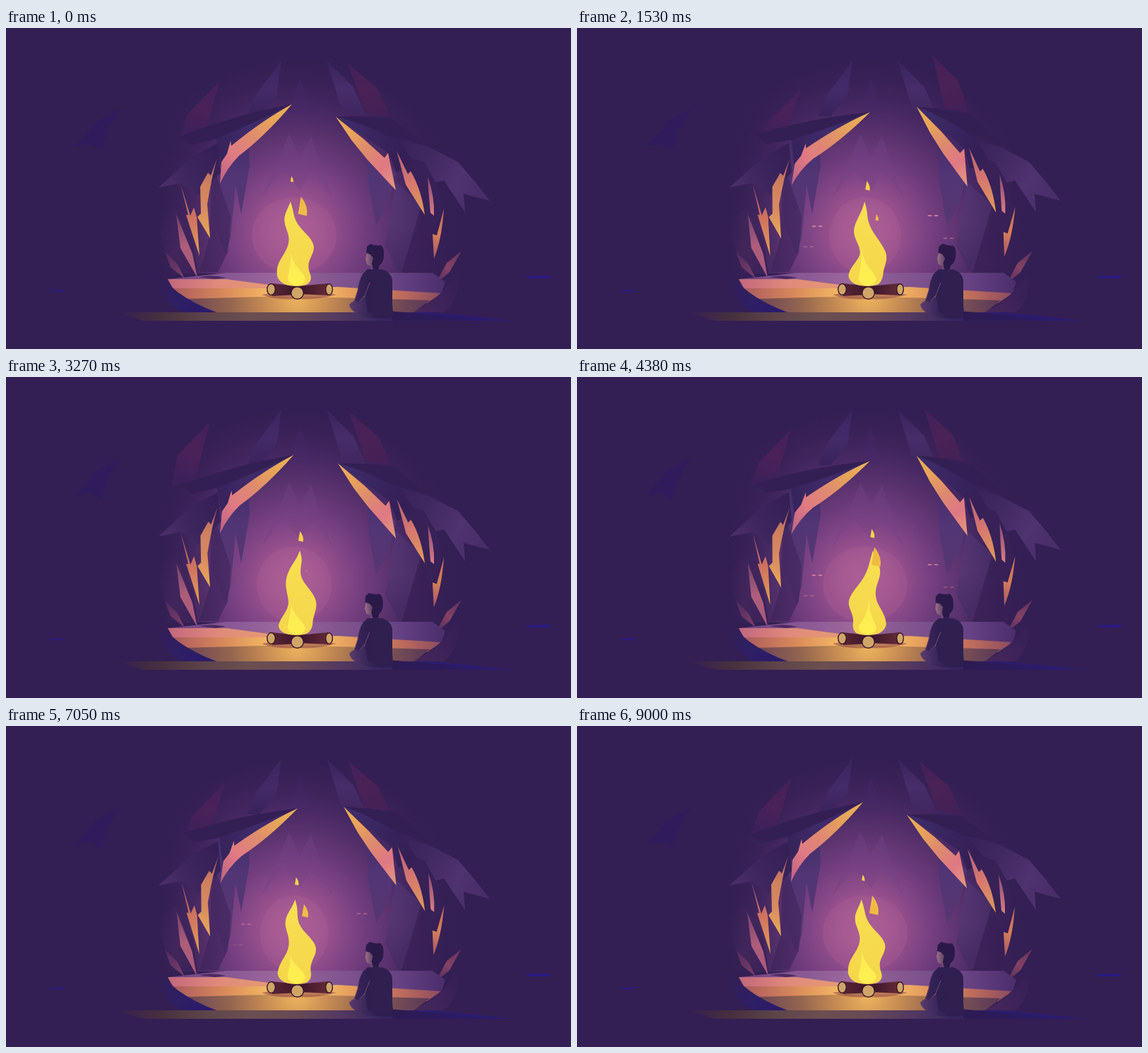
An HTML page with a canvas for the animation above (9.03 s loop, 800 by 455 pixels).

```html
<!DOCTYPE html>
<html>
<head>
<meta charset="utf-8">
<style>
html, body { margin: 0; width: 100%; height: 100%; overflow: hidden; background: #331f53 }
canvas { display: block }
</style>
</head>
<body>
<canvas id="stage" width="800" height="455"></canvas>
<script>
const c = document.getElementById('stage').getContext('2d');
const LOOP = 9030, BG = '#331f53', CLEAR = 'rgba(51,31,83,0)';
const { sin, cos, PI, sqrt, min, max, exp } = Math;

function stops(g, list) {
  list.forEach((col, i) => g.addColorStop(i / (list.length - 1), col));
  return g;
}
const lin = (x0, y0, x1, y1, ...cols) => stops(c.createLinearGradient(x0, y0, x1, y1), cols);
const rad = (x, y, r, ...cols) => stops(c.createRadialGradient(x, y, 0, x, y, r), cols);

function fill(d, style) {
  c.fillStyle = style;
  c.fill(new Path2D(d));
}

function oval(x, y, rx, ry, style) {
  c.beginPath();
  c.ellipse(x, y, rx, ry, 0, 0, 2 * PI);
  c.fillStyle = style;
  c.fill();
}

function turned(x, y, deg, dx, dy, draw) {
  c.save();
  c.translate(x + dx, y + dy);
  c.rotate(deg * PI / 180);
  c.translate(-x, -y);
  draw();
  c.restore();
}

// All motion is a function of p, the share of the loop that has passed
const turn = (p, n) => 2 * PI * n * p;
const swell = p => (1 - cos(turn(p, 3))) / 2;
function sway(p) {
  const s = swell(p);
  return s + (1 - s) * .2 * sin(PI * p) ** 2;
}

function cave(p) {
  fill('M0 0H800V455H0Z', BG);
  fill('M170 40H660V348H170Z', rad(408, 288, 245, '#a65c93', '#a15891', '#934e8b', '#7e4484', '#6b3a7a',
    '#5b336e', '#4c2b66', '#40255d', '#382156', BG));
  oval(408, 294, 54 + 6 * cos(turn(p, 2)), 54, 'rgba(190,105,150,.2)');
  fill('M362 240L384 190L401 150L416 182L432 153L446 195L462 240L432 200L417 230L392 200Z', 'rgba(116,66,132,.4)');
  fill('M416 70L433 122H400Z', 'rgba(70,42,106,.35)');

  const column = lin(0, 140, 0, 345, '#402a66', '#513575', '#573671', '#462b65');
  fill('M297 152L342 146L345 195L333 264L325 222L318 296L311 322L293 275Z', column);
  fill('M292 190L318 268L314 318L300 346H274L288 298Z', 'rgba(69,39,96,.75)');
  fill('M510 165L552 205L541 250L524 280L514 225Z', column);
  fill('M552 218L592 255L578 300L556 346L537 308Z', column);
  fill('M590 245L622 262L610 347H560Z', 'rgba(62,34,88,.85)');
  fill('M160 40H310V348H160Z', lin(215, 0, 310, 0, BG, CLEAR));
  fill('M540 40H670V348H540Z', lin(545, 0, 645, 0, CLEAR, BG));

  fill('M390 46L383 96L359 125H341L354 95Z', lin(0, 46, 0, 128, '#3a2560', '#432b69', '#38225a'));
  fill('M454 46L492 84L509 123L477 121Z', lin(0, 46, 0, 125, '#38235d', '#472d69', '#402760'));
}

function eyes(p) {
  const pair = (x, y, late, strength) => {
    c.globalAlpha = strength * max(0, swell(p - late) * 1.6 - .6);
    for (const d of [-4.5, 4.5]) oval(x + d, y, 3.2, 1, '#df86a7');
    c.globalAlpha = 1;
  };
  pair(340, 281, .01, .9);
  pair(504, 266, .01, .9);
  pair(526, 298, .05, .7);
  pair(328, 310, .01, .4);
}

function leftWall(p) {
  const s = sway(p), top = .65 * (cos(turn(p, 1)) - cos(turn(p, 3)));
  const x = 15 * top, y = 11 * top;

  fill(`M${303 + x} ${75 + y}L${257 + x} ${122 + y}L${247 + 12 * top} 154L${283 + x} 143Z`,
    lin(300, 75, 260, 153, '#452058', '#4a2258', '#3c205a'));
  fill('M216 226L262 184L300 163L304 205L272 238L248 220Z', lin(216, 225, 300, 180, '#4d306b', '#3d255d', '#352056'));
  fill('M212 273L240 256L264 300L272 352L230 333Z', lin(212, 300, 270, 310, BG, '#42265b', '#3c2259'));
  turned(304, 217, 5 * s, s, 2 * s, () => {
    fill('M297 156L405 108Q358 150 327 181L305 197Z', lin(300, 150, 390, 120, '#38245c', '#402b6b', '#3a2764'));
    fill('M246 154Q320 124 405 108Q350 135 297 157L262 166Z', BG);
    fill('M405 108Q364 130 319 167L318 160L313 178L305 190L303 221Q313 198 330 181Q366 154 405 108Z',
      lin(405, 108, 304, 215, '#edb255', '#e6a45a', '#df8a70', '#e07a84', '#c06582'));
  });
  turned(270, 300, 1.2 * s, 0, 0, () => {
    fill('M299 184L290 209L286 205L275 225L276 263L271 268L289 298L285 250Q291 212 299 184Z',
      lin(299, 184, 286, 296, '#a95b70', '#cf805f', '#d88c60', '#e8aa59'));
    fill('M247 221L258 265L255 265L274 323L270 268L266 254L261 266Z',
      lin(247, 221, 274, 322, '#a8587b', '#cf745f', '#e49f59'));
    fill('M241 264L247 312L271 354L264 320Z', lin(241, 264, 270, 352, '#6f416f', '#ae5e7a', '#a95a7d'));
  });
  fill('M225 317L233 339L253 355L243 335Z', lin(225, 317, 253, 355, '#4f2a5d', '#7c4069'));
}

function rightWall(p) {
  const s = sway(p), top = 1.2 * sin(2.5 * PI * p) ** 2 * (1 - p ** 12);
  const x = 17 * top, y = -10 * top;

  fill(`M${484 + x} ${50 + y}L${526 + x * .7} ${86 + y}L${546 + 8 * top} ${127 - 6 * top}L${509 + x * .6} ${119 + y * .5}Z`,
    lin(490, 45, 540, 125, '#442059', '#4a2256', '#412056'));
  fill('M540 154L598 168L640 190L664 218L685 245L648 235L650 261L620 216L598 222L570 190Z',
    lin(545, 160, 685, 245, '#352057', '#3f285f', '#4f3270', '#462c67'));
  fill('M551 178L592 190L612 225L617 262L600 300L588 255Z', '#372157');
  turned(553, 228, 6.9 * s, s, -5 * s, () => {
    fill('M467 126L546 146L578 190L553 205L541 177Z', lin(480, 130, 560, 180, '#3d2d6b', '#39255f', '#352056'));
    fill('M467 126Q510 124 546 128L592 164L548 156Q500 133 467 126Z', BG);
    fill('M467 126L506 157L536 184L541 177L552 230L512 187L490 160Z',
      lin(467, 126, 552, 225, '#edb154', '#e7a35a', '#dd8a6e', '#df7884', '#e3987c'));
  });
  turned(600, 280, 1.2 * s, 0, -3 * s, () => {
    fill('M553 174L569 207L573 203Q588 228 593 265L566 222Z', lin(553, 174, 593, 264, '#b3607a', '#d7786f', '#de9b5a'));
    fill('M597 211Q607 237 606 266L601 262L599 240Z', lin(597, 211, 606, 266, '#8d4a75', '#d97f83'));
    fill('M620 256Q617 300 606 327L604 292L610 294Z', lin(620, 256, 606, 326, '#bc6560', '#d58059', '#a95669'));
  });
  fill('M645 316L624 333L608 363L628 346Z', lin(645, 316, 608, 363, '#5f3060', '#844264', '#4f2a5c'));
}

function ground() {
  fill('M229 356L312 347H604L622 360L616 378H240Z',
    lin(229, 0, 622, 0, '#6c4180', '#855693', '#9d679c', '#84568f', '#6b4687', '#4b2d6c'));
  fill('M229 356H312L372 364L366 371H238Z', lin(229, 0, 372, 0, '#c3677c', '#df8a7c', '#e59a72'));
  fill('M234 369H390L470 367L617 376L596 390H262Z', rad(412, 374, 205, '#fbcf6b', '#efb062', '#d98a5a', '#b9685d', '#8a4b60'));
  fill('M250 384L400 380L600 386L577 404H298Z', rad(412, 382, 190, '#eeb45e', '#c48a53', '#94654f', '#754c55', '#573657'));
  fill('M273 353Q292 349 312 354L296 356Z', '#4c2a61');

  // Banks curving up on both sides
  fill('M213 340Q232 378 298 403H250Q214 385 213 340Z', lin(213, 345, 290, 403, BG, '#2f1f63', '#2a1a6c'));
  fill('M640 335Q630 375 577 403H620Q645 385 640 335Z', lin(590, 400, 645, 350, '#452659', '#3b2259', BG));

  fill('M155 403H600L722 415H195Z',
    lin(155, 0, 722, 0, BG, '#46303f', '#5d4449', '#6b4f50', '#684a55', '#553a61', '#36265f', '#2b1d72', '#2b1c79', BG));
  fill('M540 401L590 405L720 415H548Z', lin(540, 0, 720, 0, '#2d1b50', '#2b1b60', '#281b80'));
  fill('M735 352L772 351L768 355H740Z M60 371H82V373H64Z', '#291a84');
  fill('M98 168L130 132L162 114L143 146L135 174L120 164Z', 'rgba(43,23,112,.35)');
}

function cut(x, y, rx, ry) {
  oval(x, y, rx, ry, '#d0a568');
  c.lineWidth = 1.4;
  c.strokeStyle = '#35152c';
  c.stroke();
}

function logs() {
  fill('M362 378Q412 368 468 378Q440 386 412 384Q380 386 362 378Z', 'rgba(139,64,72,.55)');
  fill('M376 362L414 366V378L377 380Z', lin(376, 0, 414, 0, '#5a2633', '#3d152b'));
  fill('M456 362L414 366V377L457 379Z', lin(418, 0, 456, 0, '#3d152b', '#642c37'));
  cut(375.5, 370.5, 5.8, 8);
  cut(457.5, 370.5, 4.8, 7.8);
}

function fire(p) {
  const lean = -8 * cos(turn(p, 1)), N = 11;
  const side = (u, dir) => {
    const wave = sin(2 * PI * (1.4 * u - 5 * p - .45));
    const ripple = 3 * sin(2 * PI * (2.2 * u - 14 * p) + dir);
    const half = 25 * (1 - u ** 1.6) * sqrt(min(1, u * 9 + .35));
    const snake = 10 * wave * min(1, 3 * u) * (1 - u ** 3);
    return [411 + lean * u * u + snake + dir * half + ripple * u * (1 - u) * 2, 366 - 120 * u];
  };
  const tip = side(1, 0), edge = [];
  for (let i = N - 1; i >= 0; i--) edge.push(side(i / N, 1));
  for (let i = 0; i < N; i++) edge.push(side(i / N, -1));

  c.beginPath();
  c.moveTo(...tip);
  edge.forEach(([x, y], i) => {
    const [nx, ny] = edge[i + 1] || tip;
    c.quadraticCurveTo(x, y, (x + nx) / 2, (y + ny) / 2);
  });
  c.closePath();
  c.fillStyle = lin(0, 245, 0, 366, '#f8df52', '#f5d64b');
  c.fill();

  const x = 408 + 5 * sin(turn(p, 5) - 1), y = 318 + 9 * sin(turn(p, 4));
  fill(`M${x} ${y}C${x + 2} 340 420 342 424 356Q422 365 410 365Q398 363 399 352Q${x - 1} 338 ${x} ${y}Z`,
    lin(0, 310, 0, 366, '#fbe956', '#fff04f'));

  // Loose flames tear off, rise and shrink
  for (const offset of [.2, .75]) {
    const life = (5 * p + offset) % 1, h = 34 * (1 - life) * min(1, 6 * life);
    const sx = 426 - 20 * life + lean * life, sy = 278 - 78 * life ** .7;
    fill(`M${sx - h * .1} ${sy - h / 2}Q${sx + h * .3} ${sy} ${sx + h * .2} ${sy + h / 2}L${sx - h * .25} ${sy + h * .4}Z`,
      life < .4 ? '#f0bb45' : '#f6cf4b');
  }
}

function sitter(p) {
  const nod = 3 * sin(turn(p, 2)) - 32 * exp(-(((p - .6) / .08) ** 2));
  turned(521, 339, nod, nod * .15, 0, () => {
    fill('M511 318L509 327L511 335L517 338L516 343H528V328L520 316Z', lin(509, 0, 526, 0, '#a06f86', '#6c4b70', '#3c2759'));
    fill('M511 310L516 306Q523 309 531 308Q536 312 535 322Q535 332 529 336L527 342H520L518 334L520 326L516 321L510 319Z', '#2b1a49');
  });
  fill('M486 392Q491 386 500 385L512 378H546L548 404Q548 413 535 412L513 411Q488 404 486 392Z',
    lin(486, 0, 525, 0, '#5a3d6c', '#3f2a5e', '#2e1f50'));
  fill('M512 342L505 348Q499 358 498 372L493 386L500 389L508 379L512 403Q530 411 547 404L547 357Q546 347 533 342Z',
    lin(493, 0, 530, 0, '#3b2558', '#2f1f50', '#2f2050'));
  c.lineWidth = 1;
  c.strokeStyle = '#70496f';
  c.stroke(new Path2D('M510 343L505 348Q499 358 498 372L494 385M515 361L508 379L500 388'));
}

function frame(now) {
  const p = now % LOOP / LOOP;
  cave(p);
  eyes(p);
  leftWall(p);
  rightWall(p);
  ground();
  logs();
  fire(p);
  cut(412.5, 375.5, 8.8, 8.8);
  sitter(p);
  requestAnimationFrame(frame);
}
requestAnimationFrame(frame);
</script>
</body>
</html>
```
